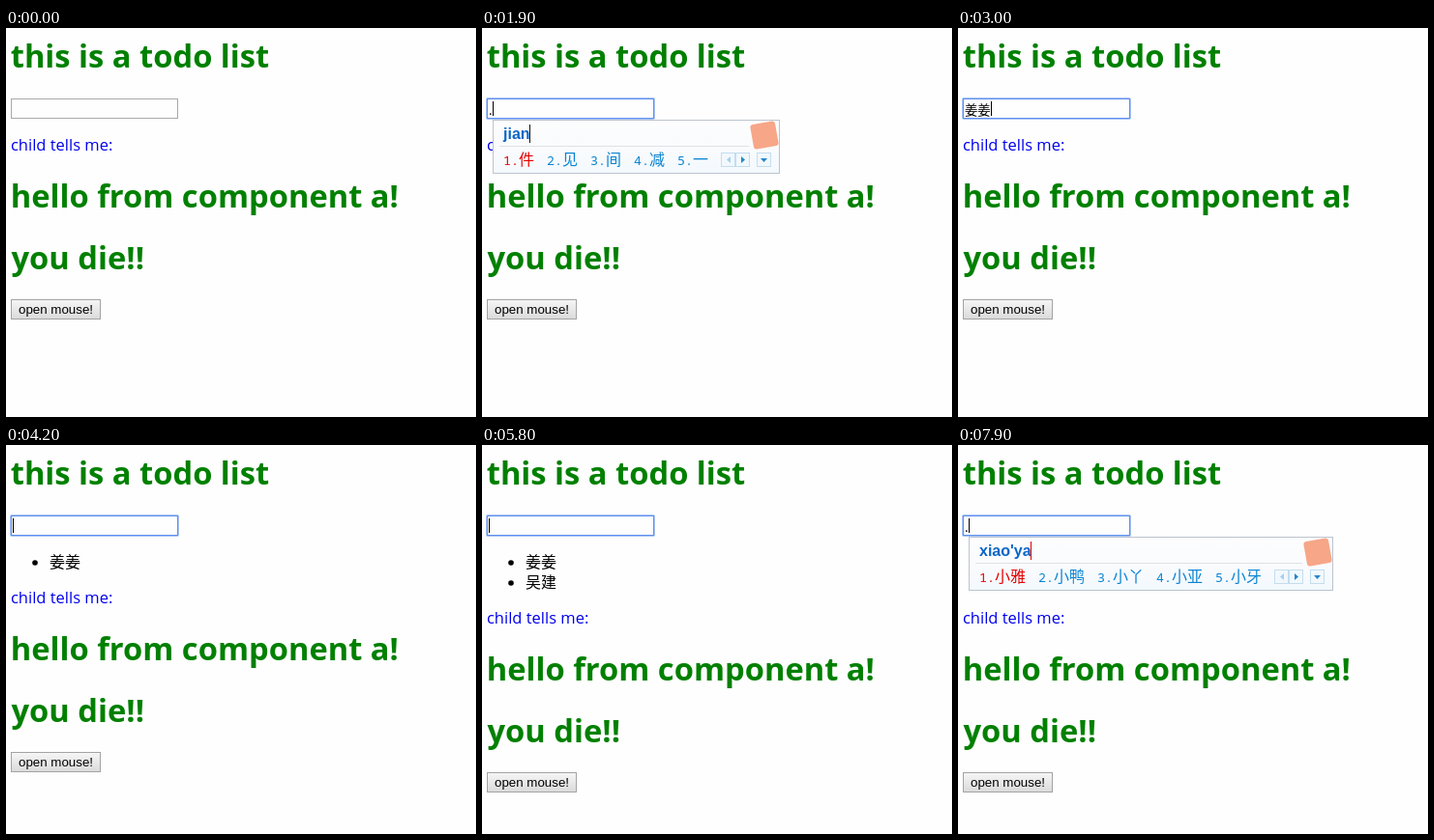
These frames come from a looping animation (486 by 403 pixels, 8 s). An HTML page:

```html
<!DOCTYPE html>
<html lang="en">
<head>
<meta charset="utf-8">
<title>Todo list</title>
<style>
  html, body { margin: 0; width: 100%; height: 100%; overflow: hidden; background: #fefefe; }
  svg { display: block; }
  text { white-space: pre; }
  .h1 { font: bold 32.7px "Open Sans", "Noto Sans", sans-serif; fill: #008000; }
  .note { font: 16.5px "Open Sans", "Noto Sans", sans-serif; fill: #0000ee; }
  .ui { font: 13.33px "Liberation Sans", Arial, sans-serif; }
  .cjk { font: 16px "Noto Sans CJK SC", "Noto Sans CJK", sans-serif; }
  .field { font: 13.33px "Noto Sans CJK SC", "Noto Sans CJK", sans-serif; }
  .pinyin { font: bold 16px "Liberation Sans", Arial, sans-serif; fill: #0a66c8; }
  .num { font: 13.33px "Noto Sans Mono", "Liberation Mono", monospace; }
</style>
</head>
<body>
<svg width="486" height="403" viewBox="0 0 486 403" xmlns="http://www.w3.org/2000/svg">
  <defs>
    <linearGradient id="buttonFill" x2="0" y2="1">
      <stop stop-color="#f6f6f6"/><stop offset="1" stop-color="#dadada"/>
    </linearGradient>
    <linearGradient id="popupFill" x2="0" y2="1">
      <stop stop-color="#fdfdfe"/><stop offset=".5" stop-color="#fafbfd"/><stop offset="1" stop-color="#f3f9fe"/>
    </linearGradient>
  </defs>
  <rect width="486" height="403" fill="#fefefe"/>
  <text class="h1" x="4.7" y="41">this is a todo list</text>

  <rect id="ring" x="4.5" y="72.5" width="174" height="22" rx="1" fill="none" stroke="#a9c4f6"/>
  <rect id="box" x="5.5" y="73.5" width="172" height="20" fill="#fefefe" stroke="#a9a9a9"/>
  <text id="value" class="field" x="7" y="89.5"></text>
  <rect id="caret" y="76" width="1" height="15"/>

  <g id="items"></g>
  <g id="lower">
    <text class="note" x="5" y="127">child tells me:</text>
    <text class="h1" x="4.7" y="186">hello from component a!</text>
    <text class="h1" x="5.5" y="250">you die!!</text>
    <rect x="5.5" y="281.5" width="92" height="20" fill="url(#buttonFill)" stroke="#a3a3a3"/>
    <text class="ui" x="13" y="296">open mouse!</text>
  </g>

  <g id="popup">
    <rect id="panel" x="11.5" y="95.5" height="55" fill="url(#popupFill)" stroke="#bcc3ce"/>
    <path id="rule" stroke="#dfe2e6"/>
    <text id="pinyin" class="pinyin" x="22" y="115"></text>
    <rect id="pinCaret" y="100" width="1" height="19"/>
    <g id="words"></g>
    <g id="tools">
      <g fill="#f1f8fd" stroke="#c3ddee">
        <rect x="-60.5" y="129.5" width="14" height="14"/>
        <rect x="-45.5" y="129.5" width="14" height="14"/>
        <rect x="-23.5" y="129.5" width="14" height="14"/>
      </g>
      <path d="M-51 133v7l-4-3.5z" fill="#a5cfea"/>
      <path d="M-40 133v7l4-3.5z" fill="#2387c9"/>
      <path d="M-20 135h7l-3.5 4z" fill="#2387c9"/>
      <rect x="-29" y="98" width="26" height="26" rx="3" fill="#f7a688" transform="rotate(-10 -16 111)"/>
    </g>
  </g>
</svg>
<script>
const LOOP = 8000, NARROW = 308, WIDE = 388;
const el = id => document.getElementById(id);
const set = (node, attrs) => { for (const k in attrs) node.setAttribute(k, attrs[k]); };
const show = (node, on) => { node.style.display = on ? '' : 'none'; };

const add = (parent, tag, attrs, text = '') => {
  const node = document.createElementNS('http://www.w3.org/2000/svg', tag);
  set(node, attrs);
  node.textContent = text;
  parent.append(node);
};

const idle = (at, caret, items = 0) => ({ at, caret: caret ? 7 : 0, items });
const typed = (at, value, items) => ({ at, value, caret: 34, items });
const compose = (at, items, pinyin, words, right = NARROW, color = '#111') =>
  ({ at, items, pinyin, words: words.split(' '), right, color, value: '.', caret: 11 });

const steps = [
  { at: 0, items: 0, blurred: true },
  idle(800, true),
  idle(1300, false),
  compose(1600, 0, 'j', '就 将 及 加 家'),
  compose(1700, 0, 'ji', '级 及 几 机 记'),
  compose(1800, 0, 'jia', '家 加 假 价 架'),
  compose(1900, 0, 'jian', '件 见 间 减 一'),
  compose(2100, 0, "jiang'j", '将军 讲究 降价 奖金 将近', WIDE),
  compose(2300, 0, "jiang'ji", '降级 讲机 奖级 酱鸡 将计', WIDE),
  compose(2500, 0, "jiang'jia", '降价 讲价 姜家 江家 奖加', WIDE),
  compose(2600, 0, "jiang'jian", '将见 降减 讲见 江间 将建', WIDE),
  compose(2800, 0, "jiang'jiang", '姜姜 讲讲 将将 奖奖 酱酱', WIDE),
  typed(3000, '姜姜', 0),
  idle(3200, true, 1),
  idle(3700, false, 1),
  idle(4200, true, 1),
  compose(4600, 1, 'w', '我 为 无 未 问'),
  compose(4800, 1, 'wu', '无 五 物 务 午'),
  compose(4900, 1, "wu'j", '吴建 午觉 无尽 五金 无极', WIDE),
  compose(5100, 1, "wu'jia", '物价 无价 五家 吾家 无假', WIDE),
  compose(5300, 1, "wu'jian", '吴建 无间 五件 物件 午间', WIDE),
  typed(5400, '吴建', 1),
  idle(5800, true, 2),
  idle(6300, false, 2),
  idle(6800, true, 2),
  compose(7200, 2, 'x', '想 谢谢 喜欢 休息 现在', 384),
  compose(7400, 2, 'xi', '西 系 喜 洗 细'),
  compose(7500, 2, 'xia', '下 夏 吓 虾 峡'),
  compose(7600, 2, 'xiao', '小 笑 校 销 消'),
  compose(7900, 2, "xiao'ya", '小雅 小鸭 小丫 小亚 小牙', WIDE, '#e00000'),
];

function drawPopup(s) {
  show(el('popup'), s.pinyin);
  if (!s.pinyin) return;
  set(el('panel'), { width: s.right - 12 });
  set(el('rule'), { d: `M18 122.5H${s.right - 32}` });
  set(el('tools'), { transform: `translate(${s.right})` });
  el('pinyin').textContent = s.pinyin;
  set(el('pinCaret'), { x: Math.floor(22 + el('pinyin').getComputedTextLength()), fill: s.color });
  el('words').replaceChildren();
  let x = 22;
  s.words.forEach((word, i) => {
    const fill = i ? '#0a84d2' : '#e60000';
    add(el('words'), 'text', { class: 'num', x, y: 142, fill }, `${i + 1}.`);
    add(el('words'), 'text', { class: 'cjk', x: x + 16, y: 142, fill }, word);
    x += 29 + 16 * word.length;
  });
}

function draw(s) {
  show(el('ring'), !s.blurred);
  set(el('box'), { stroke: s.blurred ? '#a9a9a9' : '#5e8fee' });
  el('value').textContent = s.value || '';
  show(el('caret'), s.caret);
  set(el('caret'), { x: s.caret || 0 });
  el('items').replaceChildren();
  ['姜姜', '吴建'].slice(0, s.items).forEach((name, i) => {
    add(el('items'), 'circle', { cx: 30, cy: 122 + 21 * i, r: 2.8 });
    add(el('items'), 'text', { class: 'cjk', x: 45, y: 127 + 21 * i }, name);
  });
  set(el('lower'), { transform: `translate(0 ${[0, 37, 58][s.items]})` });
  drawPopup(s);
}

const start = performance.now();
let current;
function tick() {
  const t = (performance.now() - start) % LOOP;
  const step = steps.findLast(s => s.at <= t);
  if (step !== current) draw(current = step);
  requestAnimationFrame(tick);
}
tick();
</script>
</body>
</html>
```
